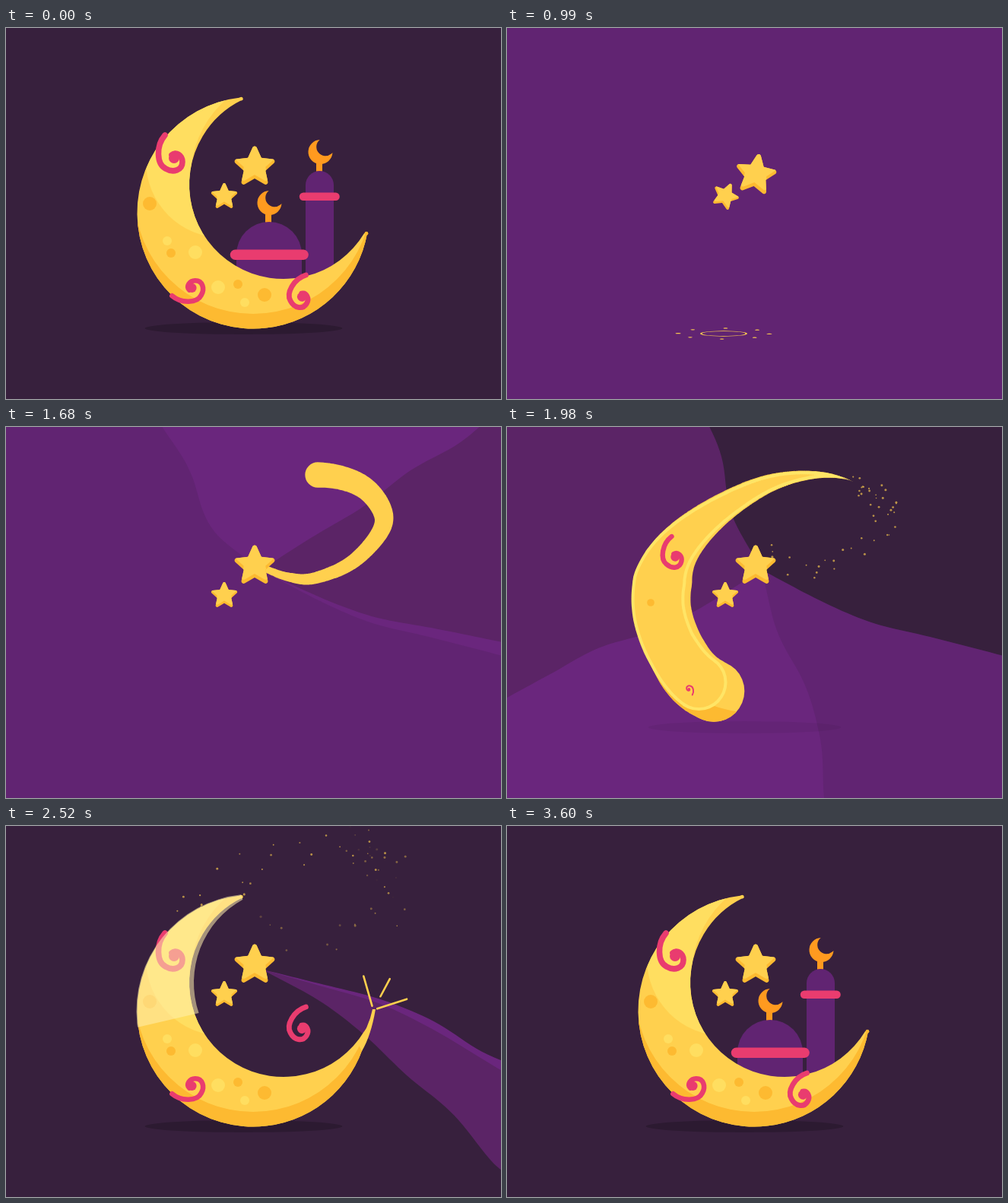
Animation of 651 by 488 pixels, one loop 5400 ms. Source, as an HTML page with a canvas:

```html
<!DOCTYPE html>
<html lang="en">
<head>
<meta charset="utf-8">
<title>Crescent night</title>
<style>
html, body { margin: 0; width: 100%; height: 100%; overflow: hidden; background: #37203d; }
canvas { display: block; }
</style>
</head>
<body>
<canvas id="stage" width="651" height="488"></canvas>
<script>
const c = document.getElementById('stage').getContext('2d');
const W = 651, H = 488, LOOP = 5400, TAU = Math.PI * 2, RAD = Math.PI / 180;
const NIGHT = '#37203d', PURPLE = '#612472', LIGHT = '#6a267d', PLUM = '#5b2466';
const GOLD = '#ffd04e', AMBER = '#fdba31', PALE = '#ffde60', PINK = '#e93c6f', ORANGE = '#ff9a1f';

const clamp = v => Math.max(0, Math.min(1, v));
const lerp = (a, b, k) => a + (b - a) * k;
const span = (t, a, b) => clamp((t - a) / (b - a));
const easeOut = u => 1 - (1 - u) ** 3;
const smooth = u => u * u * (3 - 2 * u);
const back = u => 1 + 2.7 * (u - 1) ** 3 + 1.7 * (u - 1) ** 2;

// Catmull-Rom value between b and d
const spline = (a, b, d, e, u) => 0.5 * (2 * b + (d - a) * u +
  (2 * a - 5 * b + 4 * d - e) * u * u + (3 * b - a - 3 * d + e) * u ** 3);

// Piecewise linear track of [time, value] pairs
function track(keys, t) {
  if (t <= keys[0][0]) return keys[0][1];
  for (let i = 1; i < keys.length; i++) {
    const [a, va] = keys[i - 1], [b, vb] = keys[i];
    if (t <= b) return lerp(va, vb, (t - a) / (b - a));
  }
  return keys[keys.length - 1][1];
}

function fill(color, path) { c.fillStyle = color; c.fill(path); }

function ellipse(color, x, y, rx, ry) {
  c.fillStyle = color;
  c.beginPath();
  c.ellipse(x, y, Math.max(0, rx), Math.max(0, ry), 0, 0, TAU);
  c.fill();
}
const disc = (color, x, y, r) => ellipse(color, x, y, r, r);

function pill(color, x, y, w, h, r) {
  c.fillStyle = color;
  c.beginPath();
  c.roundRect(x, y, w, h, r);
  c.fill();
}

// Runs draw() inside its own transform: move, turn, scale
function at(x, y, turn, scale, draw) {
  c.save();
  c.translate(x, y);
  c.rotate(turn);
  c.scale(scale, scale);
  draw();
  c.restore();
}

/* Sky: three fronts sweeping around the big star */
const HUB = { x: 335, y: 188 }, RADII = [0, 70, 150, 230, 310, 400, 700];
const EDGE_A = [-28, -26, -22, -20, -19], EDGE_B = [-14, -14, -16.5, -20.5, -20.5];
const FRONTS = [
  { color: LIGHT, from: 1380, to: 2150, keys: [
    [1680, [141, 126, 124, 124, 124]], [1980, [283, 290, 289, 285, 284]]] },
  { color: PLUM, from: 1530, to: 2640, keys: [
    [1680, [32, 31, 33, 32, 34]], [1980, [212, 210, 205.5, 206, 206.5]], [2520, [344, 344, 341, 338, 336]]] },
  { color: NIGHT, from: 1690, to: 2700, keys: [
    [1980, [119, 109.5, 110.5, 111.5, 112]], [2520, [332, 328, 324, 323, 320]]] }
];

function polar(r, deg) {
  return [HUB.x + r * Math.cos(deg * RAD), HUB.y - r * Math.sin(deg * RAD)];
}

function edgePoints(angles) {
  const a = [angles[0], ...angles, angles[4]], out = [];
  for (let i = 0; i < 6; i++)
    for (let j = 0; j < 10; j++) {
      const u = j / 10;
      const deg = spline(a[Math.max(0, i - 1)], a[i], a[i + 1], a[Math.min(6, i + 2)], u);
      out.push(polar(lerp(RADII[i], RADII[i + 1], u), deg));
    }
  return out;
}

function sky(t) {
  c.fillStyle = PURPLE;
  c.fillRect(0, 0, W, H);
  const bend = span(t, 2000, 2500);
  for (const f of FRONTS) {
    if (t <= f.from) continue;
    c.fillStyle = f.color;
    if (t >= f.to) { c.fillRect(0, 0, W, H); continue; }
    const lift = f.color === PLUM ? 3 * (1 - bend) : 0;
    const start = EDGE_A.map((a, i) => lerp(a, EDGE_B[i], bend) + lift);
    const keys = [[f.from, start], ...f.keys, [f.to, start.map(a => a + 360)]];
    const front = start.map((_, i) => track(keys.map(([k, v]) => [k, v[i]]), t));
    const rim = [];
    for (let a = start[4]; a < front[4]; a += 4) rim.push(polar(700, a));
    c.beginPath();
    for (const p of [...edgePoints(start), ...rim, polar(700, front[4]), ...edgePoints(front).reverse()])
      c.lineTo(p[0], p[1]);
    c.fill();
  }
}

/* Stars */
const starPath = new Path2D();
(() => {
  const pt = i => {
    const r = i % 2 ? 15 : 32, a = i * TAU / 10 - TAU / 4;
    return [r * Math.cos(a), r * Math.sin(a)];
  };
  starPath.moveTo(...pt(-1));
  for (let i = 0; i < 10; i += 2) {
    starPath.arcTo(...pt(i), ...pt(i + 1), 3);
    starPath.lineTo(...pt(i + 1));
  }
  starPath.closePath();
})();

function star(x, y, turn, scale) {
  at(x, y, turn, scale, () => {
    fill(AMBER, starPath);
    c.clip(starPath);
    c.translate(0, -5);
    fill(GOLD, starPath);
  });
}

const STARS = [
  { x: 327, y: 183, scale: 1, hitX: 333, floor: 381, drop: 45, hit: 420, peak: 750, top: 148, spin: 750 },
  { x: 287, y: 222, scale: 0.65, hitX: 285, floor: 402, drop: 195, hit: 570, peak: 820, top: 194, spin: 690 }
];

function ripple(x, y, u) {
  if (u <= 0 || u >= 1) return;
  const e = easeOut(u), rx = 31 * Math.min(1, e * 2.1), hole = 0.57 + 0.4 * u;
  c.fillStyle = GOLD;
  c.beginPath();
  c.ellipse(x, y, rx, rx / 8.5, 0, 0, TAU);
  c.ellipse(x, y, rx * hole, rx / 8.5 * hole * 0.9, 0, 0, TAU);
  c.fill('evenodd');
  const R = 60 * e ** 0.2;
  for (let i = 0; i < 8; i++) {
    const a = i * TAU / 8 + 0.04;
    ellipse(GOLD, x + R * Math.cos(a), y + R / 8.5 * Math.sin(a),
      (i % 4 ? 4.5 : 5.5) * (1 - 0.4 * u), 0.8 - 0.3 * u ** 4);
  }
}

function drawStar(s, t) {
  if (t < s.drop) return;
  if (t < s.hit) {
    const u = span(t, s.drop, s.hit), k = s.scale === 1 ? 1.3 : 1;
    ellipse(GOLD, lerp(s.x, s.hitX, u * u * 0.3), lerp(-40, s.floor, u * u), 15 * k, 24 * k);
    return;
  }
  let y;
  if (t < s.peak) {
    const u = (s.peak - t) / (s.peak - s.hit);
    y = lerp(s.top, s.floor, u * u);
  } else {
    const low = s.y + (s.scale === 1 ? 11 : 2);
    y = t < s.peak + 210
      ? lerp(s.top, low, smooth(span(t, s.peak, s.peak + 210)))
      : lerp(low, s.y, smooth(span(t, s.peak + 210, s.peak + 400)));
  }
  const u = span(t, s.hit, s.hit + s.spin);
  star(lerp(s.hitX, s.x, easeOut(span(t, s.hit, s.hit + 120))), y, 164 * RAD * (1 - u) ** 2, s.scale);
}

/* Moon */
const OUT = { x: 325, y: 243, r: 152.5 }, INN = { x: 365, y: 206, r: 124 };
const moonPath = new Path2D();
moonPath.arc(OUT.x, OUT.y, OUT.r, -96.4 * RAD, 10 * RAD, true);
moonPath.arc(INN.x, INN.y, INN.r, 31 * RAD, -116 * RAD);
moonPath.closePath();

const shadePath = new Path2D('M0 0H651V488H0Z');
shadePath.moveTo(481, 220);
shadePath.arc(325, 220, 156, 0, TAU);

const notHollow = new Path2D('M0 0H651V488H0Z');
notHollow.moveTo(513, 196);
notHollow.arc(378, 196, 135, 0, TAU);

function shade() {
  c.save();
  c.beginPath();
  c.rect(0, 235, W, H);
  c.clip();
  c.fillStyle = AMBER;
  c.fill(shadePath, 'evenodd');
  c.restore();
}

function fullMoon(t) {
  fill(GOLD, moonPath);
  disc(GOLD, 309.3, 93.2, 2.4);
  disc(AMBER, 474, 270.2, 2.4);
  c.save();
  c.clip(moonPath);
  shade();
  c.globalAlpha = span(t, 2240, 2360);
  c.clip(notHollow, 'evenodd');
  disc(PALE, 285, 175, 101);
  c.restore();
  const ext = 1 - smooth(span(t, 2540, 2660));
  if (ext > 0) {
    const x = lerp(474, 484, ext), y = lerp(271, 241, ext);
    c.fillStyle = GOLD;
    c.beginPath();
    c.moveTo(462, 285);
    c.quadraticCurveTo(477, 266, x - 2, y);
    c.lineTo(x + 2, y);
    c.quadraticCurveTo(480, 276, 468, 296);
    c.fill();
  }
}

// Route of the streak: out of the star, around, then along the crescent
const ROUTE = [[335, 184], [370, 197], [405, 199], [455, 178], [492, 138], [494, 108], [465, 76],
  [410, 63], [340, 76], [266, 119], [217, 171], [203.5, 230], [220, 289], [257, 339], [330, 363],
  [400, 347], [450, 310], [478, 268], [488, 238]];

function onRoute(p) {
  const last = ROUTE.length - 1, i = Math.max(0, Math.min(last - 1, Math.floor(p)));
  const q = k => ROUTE[Math.max(0, Math.min(last, i + k))];
  return [0, 1].map(k => spline(q(-1)[k], q(0)[k], q(1)[k], q(2)[k], p - i));
}

const HEAD = [[1380, 0], [1680, 7], [1980, 13], [2160, 17], [2250, 18]];
const TAIL = [[1690, 0], [1980, 6.15], [2250, 8.45]];

function girth(p, x, y, tail, t) {
  const thin = 4 + 1.8 * p, wide = 38 * clamp((p - tail) / 4.4) ** 1.3;
  const taper = lerp(thin, wide, span(t, 1680, 1980));
  const fit = Math.max(2, (OUT.r - INN.r + Math.hypot(x - INN.x, y - INN.y) - Math.hypot(x - OUT.x, y - OUT.y)) / 2);
  return lerp(taper, fit, Math.max(smooth(span(t, 2000, 2240)), span(p, 12, 13.2)));
}

function streakPath(tail, head, t, scale, inset, shift) {
  const path = new Path2D();
  for (let p = tail; p <= head; p += 0.04) {
    const [x, y] = onRoute(p), r = girth(p, x, y, tail, t) * scale - inset;
    if (r <= 0) continue;
    const dx = shift * span(p, 8.5, 10.5) * (1 - span(p, 12, 13));
    path.moveTo(x + dx + r, y);
    path.arc(x + dx, y, r, 0, TAU);
  }
  return path;
}

function streak(t) {
  const head = track(HEAD, t), tail = track(TAIL, t), grow = span(t, 1720, 1980);
  const body = streakPath(tail, Math.min(18, head + 0.22 * grow), t, 1, 0, 0);
  fill(GOLD, body);
  if (t < 1720) return;
  c.save();
  c.clip(body);
  if (t > 1850) shade();
  c.restore();
  c.save();
  c.globalAlpha = grow * (1 - span(t, 2050, 2200));
  const face = head - 0.08 * grow;
  fill('#ffe566', streakPath(tail, face, t, 0.92, 0, -5));
  fill(GOLD, streakPath(tail, face, t, 0.92, 4, -5));
  c.restore();
}

const SPOTS = [[189, 231, 9, 1], [217, 296, 6, 1], [212, 280, 6, 0], [249, 295, 9, 0],
  [279, 341, 9, 0], [305, 337, 6, 1], [314, 361, 6, 0], [340, 351, 9, 1]];

function spots(t) {
  SPOTS.forEach(([x, y, r, dark], i) => {
    const from = 1940 + i * 45;
    disc(dark ? AMBER : PALE, x, y, r * easeOut(span(t, from, from + 180)));
  });
}

function sheen(t) {
  const v1 = Math.min(2.68, (t - 2400) / 120), v0 = Math.max(0, (t - 2568) / 120);
  if (v1 <= v0) return;
  const o = v => (264 - 91.4 * v) * RAD, n = v => (241 - 79 * v) * RAD;
  c.fillStyle = 'rgba(255,240,175,.55)';
  c.beginPath();
  c.arc(OUT.x, OUT.y, 153.5, o(v0), o(v1), true);
  c.arc(372, 206, 125, n(v1), n(v0));
  c.fill();
}

const curl = new Path2D('M-13-30C-25-16-24 8-12 14C-2 20 10 16 10 5C10-4 1-9-4-4');

function swirl(x, y, deg, scale) {
  if (scale <= 0) return;
  at(x, y, deg * RAD, scale, () => {
    c.strokeStyle = PINK;
    c.lineWidth = 7.6;
    c.lineCap = 'round';
    c.stroke(curl);
    disc(PINK, -1, 0, 7);
  });
}

function swirls(t) {
  swirl(222, 171, lerp(12, 0, span(t, 1980, 2100)), easeOut(span(t, 1880, 2100)));
  swirl(lerp(239, 244.5, span(t, 1980, 2120)), lerp(345, 341, span(t, 1980, 2120)),
    lerp(170, 270, span(t, 1980, 2180)), 0.87 * easeOut(span(t, 1955, 2180)));
  const fall = span(t, 2430, 2640);
  swirl(390, 354 - 105 * (1 - fall ** 2.1), 32, 0.9 * easeOut(span(t, 2400, 2520)));
}

function sparks(t) {
  if (t < 2420 || t > 2660) return;
  c.strokeStyle = GOLD;
  c.lineWidth = 2.6;
  c.lineCap = 'round';
  const end = 47 * easeOut(span(t, 2400, 2560));
  [[-106, 2590], [-62, 2550], [-18, 2590]].forEach(([deg, stop], i) => {
    const start = lerp(i === 1 ? 8 : 2, 47, span(t, stop - 90, stop + 60) ** 1.3);
    if (start >= end) return;
    const x = Math.cos(deg * RAD), y = Math.sin(deg * RAD);
    c.beginPath();
    c.moveTo(483 + x * start, 242 + y * start);
    c.lineTo(483 + x * end, 242 + y * end);
    c.stroke();
  });
}

/* Glitter left along the route */
let seed = 11;
const rnd = () => (seed = seed * 16807 % 2147483647) / 2147483647;
const GLITTER = Array.from({ length: 75 }, () => {
  const p = 0.3 + 10 * rnd() ** 0.85;
  return {
    p, born: p < 6.15 ? 1690 + p * 47 : 1980 + (p - 6.15) * 85, life: 450 + 600 * rnd(),
    x: (rnd() - 0.5) * 30, y: (rnd() - 0.5) * 26, vx: (rnd() - 0.4) * 60, vy: -20 - 80 * rnd(), r: 0.8 + 0.8 * rnd()
  };
});

function glitter(t) {
  for (const g of GLITTER) {
    const u = (t - g.born) / g.life;
    if (u <= 0 || u >= 1) continue;
    const [x, y] = onRoute(g.p);
    c.globalAlpha = 0.65 * Math.min(1, 2.4 * (1 - u));
    disc(GOLD, x + g.x + g.vx * u, y + g.y + g.vy * u, g.r);
  }
  c.globalAlpha = 1;
}

/* Mosque */
const hornPath = new Path2D();
hornPath.arc(0, 0, 16, 48 * RAD, -48 * RAD);
hornPath.arc(9.5, 0, 12, -84 * RAD, 84 * RAD, true);
hornPath.closePath();

function finial(x, y, u) {
  if (u <= 0) return;
  at(x, y, 0, back(u), () => {
    c.fillStyle = ORANGE;
    c.fillRect(-4, -15, 8, 17);
    at(1.5, -26, -45 * RAD - 2 * (1 - easeOut(u)), 1, () => fill(ORANGE, hornPath));
  });
}

function band(x, y, w, h, u) {
  const k = back(u) * w;
  if (k > 0) pill(PINK, x - k / 2, y, k, h, h / 2);
}

function mosque(t) {
  if (t < 2870) return;
  const tower = 150 * (1 - back(span(t, 2940, 3260))), dome = 95 * (1 - back(span(t, 2870, 3160)));
  c.save();
  c.beginPath();
  c.arc(INN.x, INN.y, 129, 0, TAU);
  c.clip();
  finial(412, 189 + tower, span(t, 3240, 3580));
  pill(PURPLE, 394, 188 + tower, 37, 190, [18.5, 18.5, 0, 0]);
  finial(345, 256 + dome, span(t, 3180, 3520));
  pill(PURPLE, 303, 255 + dome, 86, 120, [43, 43, 0, 0]);
  c.restore();
  band(412.3, 216.5 + tower, 53, 10.5, span(t, 3180, 3440));
  band(346.3, 291.5 + dome, 103, 13.5, span(t, 3100, 3380));
}

function scene(t) {
  sky(t);
  const shadow = span(t, 1900, 2200);
  if (shadow > 0) ellipse(`rgba(0,0,0,${0.2 * shadow})`, 312.5, 395, 130 * easeOut(span(t, 1780, 2060)), 8);
  for (const s of STARS) ripple(s.hitX, s.floor, span(t, s.hit, s.hit + 480));
  mosque(t);
  glitter(t);
  if (t >= 2250) fullMoon(t);
  else if (t > 1380) streak(t);
  spots(t);
  swirls(t);
  sheen(t);
  sparks(t);
  for (const s of STARS) drawStar(s, t);
}

function tick(now) {
  const t = now % LOOP;
  c.clearRect(0, 0, W, H);
  scene(t < 30 ? LOOP : t);
  requestAnimationFrame(tick);
}
scene(LOOP);
requestAnimationFrame(tick);
</script>
</body>
</html>
```
